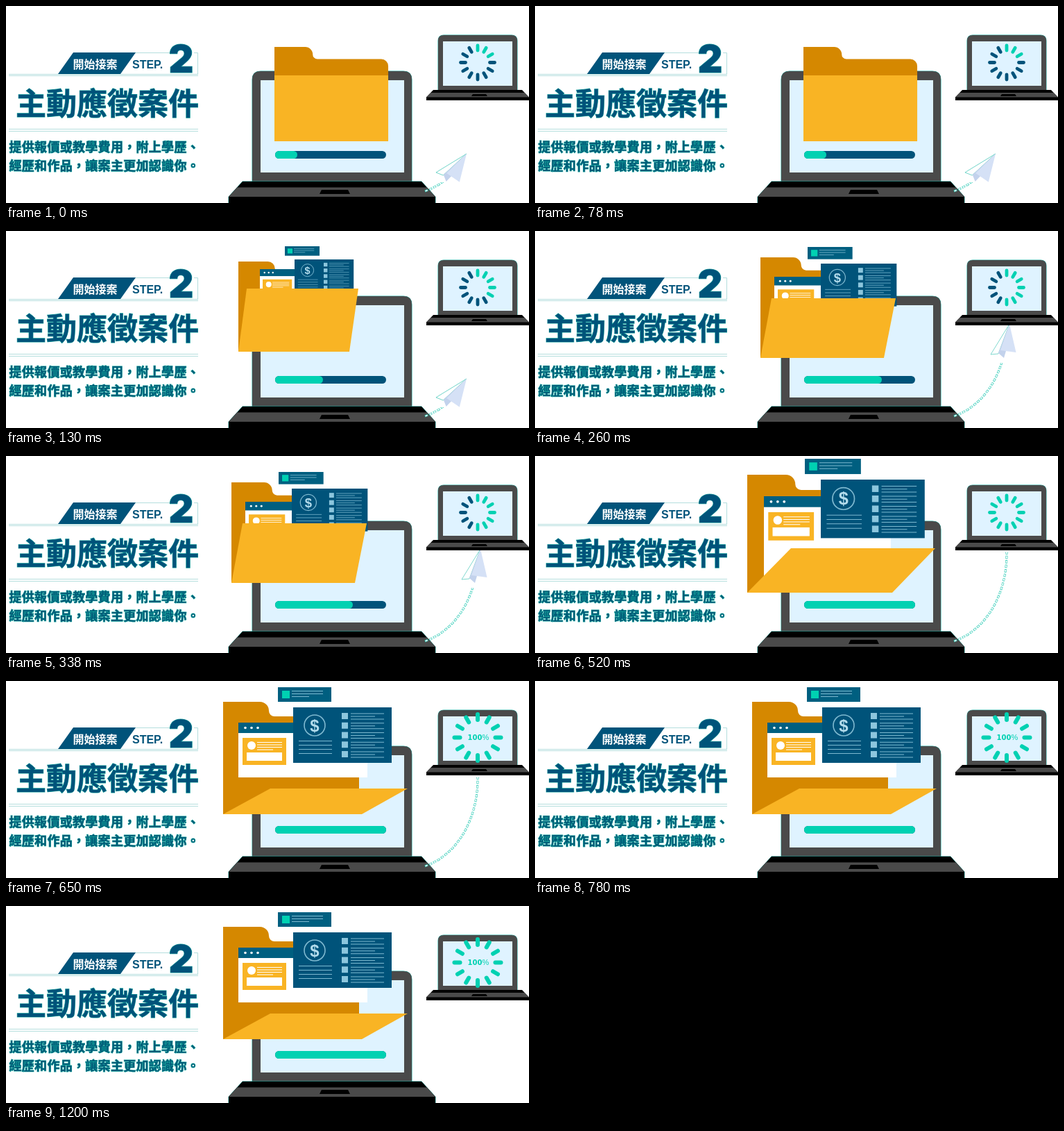
Animation of 754x284 px, one loop 1.48 s. Source, as an HTML page:

```html
<!DOCTYPE html>
<html lang="zh-Hant">
<head>
<meta charset="utf-8">
<style>
  html, body { margin: 0; width: 100%; height: 100%; overflow: hidden; background: #fff; }
  svg { display: block; width: 754px; height: 284px; }
  .cjk { font-family: "Noto Sans CJK TC", "Noto Sans CJK", sans-serif; }
  .latin { font-family: "Liberation Sans", Arial, sans-serif; }
  .bold { font-weight: 700; }
  .navy { fill: #00537a; }
  .blue { fill: #005f80; }
  .teal { fill: #00d1b2; }
  .amber { fill: #f9b424; }
  .sky { fill: #dff3ff; }
  .gray { fill: #4a4a4a; }
  .white { fill: #fff; }
  .rim { stroke: #12aa9e; stroke-width: 1; paint-order: stroke; }
  .line { fill: none; stroke-width: 1; }
  .rule { stroke: #b4dedd; }
  .ink { stroke: #7fb9d0; }
</style>
</head>
<body>
<svg viewBox="0 0 754 284">
  <!-- heading -->
  <path class="line rule" d="M4 98.5H277M4 100.5H277M4 177.5H277M4 180.5H277M186 67.5H236M271 67.5H276.5V98"/>
  <path class="navy" d="M97 67H187L165 98H75Z"/>
  <text class="cjk bold white" x="96.500" y="90.400" font-size="16">開始接案</text>
  <text class="latin bold navy" x="182" y="90" font-size="16">STEP.</text>
  <text class="navy rim" x="234.500" y="95.500" font-size="55.500" font-weight="900" font-family="Inter, sans-serif">2</text>
  <text class="cjk bold navy rim" x="14" y="156.700" font-size="44">主動應徵案件</text>
  <g class="cjk bold rim" fill="#005c78" font-size="18" letter-spacing=".3">
    <text x="4.500" y="209.500">提供報價或教學費用，附上學歷、</text>
    <text x="4.500" y="236.500">經歷和作品，讓案主更加認識你。</text>
  </g>

  <!-- large laptop -->
  <path class="gray rim" d="M355 254V106Q355 94 367 94H573Q585 94 585 106V254Z"/>
  <path class="sky" d="M367 107H574V240H367Z"/>
  <path class="rim" d="M341 253H599L619 275V284H321V275Z"/>
  <path class="gray" d="M333 261.500H607L619 275H321Z"/>
  <path d="M455 265H493L496 271H452Z"/>
  <rect class="navy" x="388" y="209" width="160" height="11" rx="5.5"/>
  <rect class="teal" id="load" x="388" y="209" height="11" rx="5.5"/>

  <!-- trail and paper plane -->
  <clipPath id="reach"><rect id="reachBox" x="590" width="120" height="150"/></clipPath>
  <g id="trail" clip-path="url(#reach)" fill="none">
    <path d="M604 267C648 252 681 202 680 138" stroke="#2ccab5" stroke-width="3" stroke-dasharray="4.5 2"/>
    <path d="M604 267C648 252 681 202 680 138" stroke="#fff" stroke-width="1.8" stroke-dasharray="3 3.5" stroke-dashoffset="-.75"/>
  </g>
  <g id="plane" stroke-linejoin="round">
    <path fill="#fff" stroke="#5fcfc2" stroke-width=".8" d="M0 0L-27 44L-16 43Z"/>
    <path fill="#c3d2ec" d="M0 0L-16 42L-8 49L-5 39Z"/>
    <path fill="#d5e1f6" d="M0 0L9.500 41L-13 38Z"/>
  </g>

  <!-- small laptop -->
  <path class="gray rim" d="M623 122V50Q623 42 631 42H729Q737 42 737 50V122Z"/>
  <path class="sky" d="M630 51H730V115H630Z"/>
  <path d="M616 121H744L754 131.500V136H606V131.500Z"/>
  <path class="gray" d="M612.500 125H747.500L754 131.500H606Z"/>
  <path d="M673 127H692L694 130H671Z"/>
  <g id="spinner" transform="translate(680 81.500)" stroke-linecap="round"></g>
  <g id="done" class="teal" font-size="10">
    <text class="bold" x="665.500" y="85" font-family="DejaVu Sans, sans-serif">100</text>
    <text class="latin" x="686.500" y="85" font-size="11">%</text>
  </g>

  <!-- folder -->
  <path id="back" fill="#d58800" d="M0 0H53A13 13 0 0 1 66 13A8 8 0 0 0 74 21H184A12 12 0 0 1 196 33V162H0Z"/>
  <g id="docs">
    <g id="page">
      <rect id="sheet" class="white"/>
      <rect id="head" class="blue" height="15"/>
      <g class="white">
        <circle cx="10" cy="7.500" r="1.800"/><circle cx="19" cy="7.500" r="1.800"/><circle cx="28" cy="7.500" r="1.800"/>
        <rect class="amber" x="6" y="22" width="63" height="39"/>
        <circle cx="19" cy="33" r="6"/>
        <rect x="12" y="43" width="51" height="12"/>
      </g>
      <path class="line" stroke="#fff" d="M27 28.500H63M27 32H63M27 35.500H63M27 39H50"/>
    </g>
    <g id="card">
      <rect class="navy" width="142" height="80"/>
      <circle class="line ink" cx="31" cy="26" r="15" style="stroke-width:1.6"/>
      <text class="latin bold" x="31" y="34.500" font-size="24" text-anchor="middle" fill="#b4dcec">$</text>
      <path class="line ink" d="M8 48.500H56M8 54.500H56M8 60.500H56M8 66.500H56"/>
      <g id="list"></g>
    </g>
    <g id="tag">
      <rect class="blue" width="77" height="21"/>
      <rect class="teal" x="6" y="5" width="11" height="11"/>
      <path class="line ink" d="M20 5.500H65M20 9.500H65M20 13.500H45"/>
    </g>
  </g>
  <path id="front" class="amber"/>
</svg>
<script>
const el = id => document.getElementById(id);
const set = (id, attrs) => {
  for (const key in attrs) el(id).setAttribute(key, attrs[key]);
};
const place = (id, [x, y, scale]) =>
  set(id, { transform: `translate(${x} ${y}) scale(${scale})` });
const show = (id, on) => set(id, { display: on ? "inline" : "none" });

// back, page, card, tag: x, y, scale; front: top left, top right, top, left, right, bottom
const poses = [
  { load: 32, lit: 3, back: [387, 59, .837], front: [387, 551, 100, 387, 551, 195] },
  { load: 69, lit: 5, back: [335, 44, .8], front: [347, 508, 83, 335, 495, 174],
    page: [366, 55, .67], card: [416, 41, .6], tag: [402, 22, .65] },
  { load: 112, lit: 7, back: [325, 38, .89], front: [341, 520, 97, 325, 503, 183],
    page: [345, 66, .83], card: [412, 47, .77], tag: [393, 23, .84] },
  { load: 139, lit: 10, back: [318, 33, .95], front: [346, 536, 96, 318, 508, 187],
    page: [339, 62, .89], card: [410, 42, .825], tag: [390, 16, .91] },
  { load: 160, lit: 12, back: [306, 27, 1.05], front: [369, 577, 133, 306, 515, 197],
    page: [330, 58, 1.045], card: [412, 34, 1.055], tag: [389, 4, 1.05], size: [175, 115] },
  { load: 160, lit: 12, back: [313, 30, 1], front: [381, 579, 155, 313, 513, 192],
    page: [335, 60, 1], card: [414, 38, 1], tag: [392, 9, 1] }
];

el("spinner").innerHTML = Array.from({ length: 12 }, (_, i) =>
  `<line transform="rotate(${i * 30})"/>`).join("");
el("list").innerHTML = [0, 1, 2, 3, 4].map(i =>
  `<g transform="translate(70 ${8 + i * 13.75})"><rect width="9" height="9" fill="#8cc6dd"/>
   <path class="line ink" d="M13 1H61M13 5H48M13 9H61"/></g>`).join("");

function draw(step) {
  const pose = poses[Math.min(step, 5)];
  const done = step > 4;

  set("load", { width: pose.load });
  [...el("spinner").children].forEach((spoke, i) => {
    spoke.setAttribute("y1", done ? -25.5 : -17.5);
    spoke.setAttribute("y2", done ? -33.5 : -24.5);
    spoke.setAttribute("stroke-width", done ? 6 : 4.8);
    spoke.setAttribute("stroke", i < pose.lit ? "#00d1b2" : "#00537a");
  });
  show("done", done);

  show("trail", step < 6);
  set("reachBox", { y: step < 2 ? 254 : step < 4 ? 190 : 137 });
  show("plane", step < 4);
  set("plane", { transform: step < 2 ? "translate(664 213) rotate(27)" : "translate(684 134)" });

  place("back", pose.back);
  const [x1, x2, top, left, right, bottom] = pose.front;
  set("front", { d: `M${x1} ${top}H${x2}L${right} ${bottom}H${left}Z` });

  show("docs", pose.page);
  if (pose.page) {
    const [width, height] = pose.size || [186, 79];
    for (const id of ["page", "card", "tag"]) place(id, pose[id]);
    set("sheet", { width, height });
    set("head", { width });
  }
}

function tick() {
  draw(Math.min(6, Math.floor(performance.now() % 1480 / 130)));
  requestAnimationFrame(tick);
}
tick();
</script>
</body>
</html>
```
